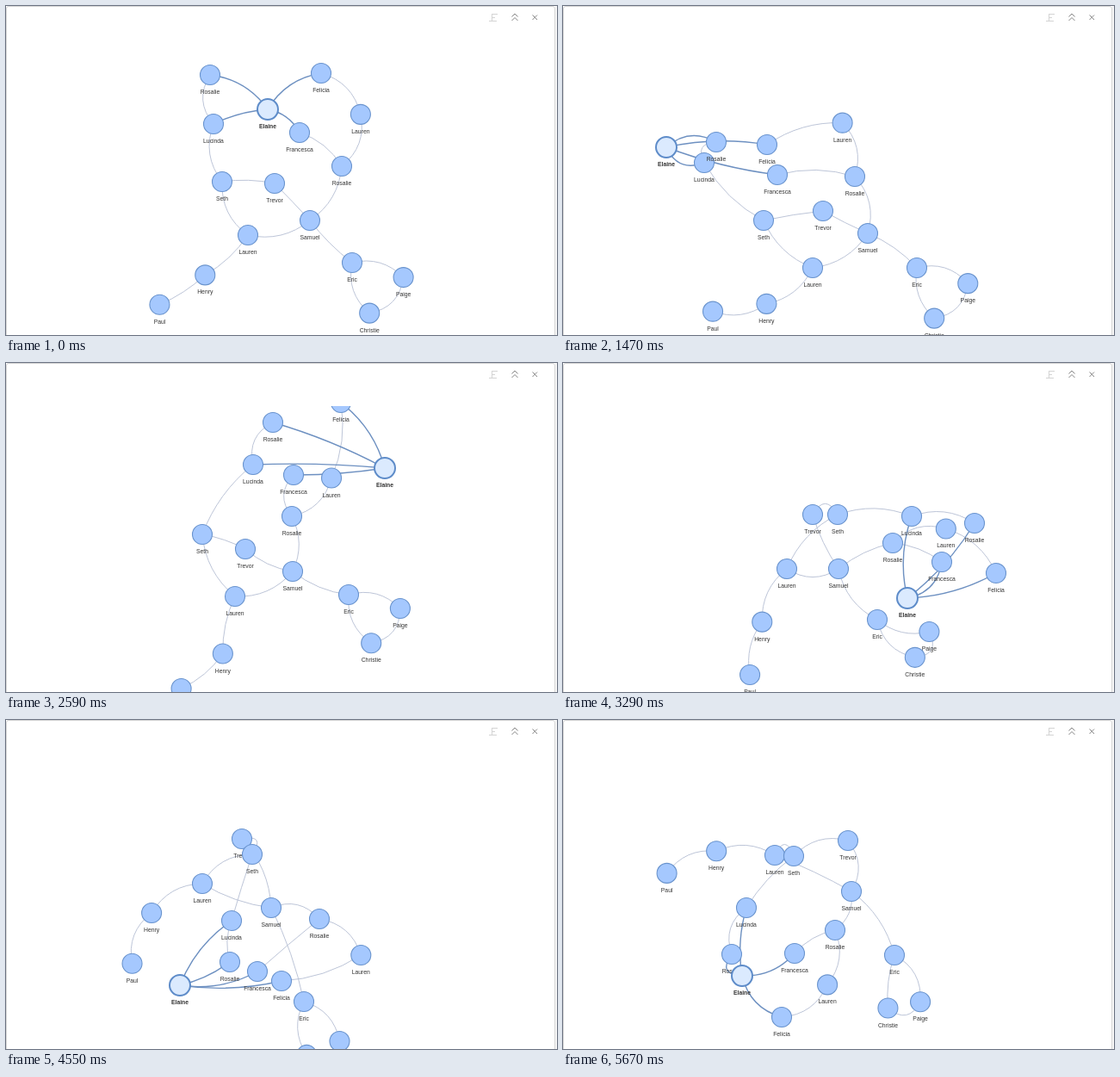
An HTML page that plays this animation: 640 px wide and 382 px high, repeating every 5740 ms.

```html
<!DOCTYPE html>
<html lang="en">
<head>
<meta charset="utf-8">
<title>Network graph</title>
<style>
html, body { margin: 0; width: 100%; height: 100%; overflow: hidden; background: #fff; }
svg { display: block; width: 640px; height: 382px; }
path { fill: none; }
.frame { stroke: #d6d6d6; }
.icon { stroke: #858585; stroke-width: 1; }
.faint { stroke: #d4d4d4; }
.edge { stroke: #bdc5d8; stroke-width: 1; }
.edge.active { stroke: #6d90c1; stroke-width: 1.4; }
circle { fill: #a5c8fe; stroke: #6993cd; stroke-width: 1.1; }
text { font: 6.8px "Liberation Sans", Arial, sans-serif; fill: #343434; text-anchor: middle; }
.active circle { fill: #dbeafe; stroke: #5e8cc9; stroke-width: 2; }
.active text { font-weight: bold; }
</style>
</head>
<body>
<svg viewBox="0 0 640 382">
  <clipPath id="view"><rect y="50" width="637" height="332"/></clipPath>
  <rect x="638" width="2" height="382" fill="#f6f6f6"/>
  <path class="frame" d="M0.5 382V3Q.5.5 3 .5H635Q637.5.5 637.5 3V382"/>
  <path class="icon faint" d="M564 9.5H571M564.5 9V17M564 13.5H568M561 17.5H570"/>
  <path class="icon" d="M587.5 12.5L591 9L594.5 12.5M587.5 17L591 13.5L594.5 17"/>
  <path class="icon" d="M611.5 10.5L617 16M617 10.5L611.5 16"/>
  <g clip-path="url(#view)"><g id="edges"></g><g id="nodes"></g></g>
</svg>
<script>
const LOOP = 5740, STEP = 70;
const KEYS = [0, 910, 1470, 2590, 3290, 4550, 5670];
const nodes = [], edges = [];

function add(parent, tag, attrs, text) {
  const el = document.createElementNS('http://www.w3.org/2000/svg', tag);
  for (const k in attrs) el.setAttribute(k, attrs[k]);
  if (text) el.textContent = text;
  return parent.appendChild(el);
}

// Cubic Hermite through unevenly spaced keys, at rest at both ends
function sample(v, t, keys = KEYS) {
  const last = keys.length - 1;
  let i = 0;
  while (i < last - 1 && t >= keys[i + 1]) i++;
  const slope = k => k === 0 || k === last ? 0 : (v[k + 1] - v[k - 1]) / (keys[k + 1] - keys[k - 1]);
  const h = keys[i + 1] - keys[i];
  const u = Math.min(1, (t - keys[i]) / h), w = 1 - u;
  return v[i] * (1 + 2 * u) * w * w + v[i + 1] * u * u * (3 - 2 * u)
    + h * u * w * (slope(i) * w - slope(i + 1) * u);
}

// A node either follows a path or swings around another node at a fixed distance
const path = (xs, ys, keys) => t => ({ x: sample(xs, t, keys), y: sample(ys, t, keys) });

const swing = (hub, length, ...degrees) => t => {
  const a = sample(degrees, t) * Math.PI / 180;
  return { x: hub.x + length * Math.cos(a), y: hub.y + length * Math.sin(a) };
};

function node(name, place, active = false) {
  const el = add(document.getElementById('nodes'), 'g', active ? { class: 'active' } : {});
  add(el, 'circle', { r: active ? 12 : 11.5 });
  add(el, 'text', { y: 22 }, name);
  const n = { el, place, active };
  nodes.push(n);
  return n;
}

function link(a, ...others) {
  for (const b of others) {
    const active = a.active || b.active;
    const el = add(document.getElementById('edges'), 'path', { class: active ? 'edge active' : 'edge' });
    edges.push({ el, a, b });
  }
}

const lauren2 = node('Lauren', path([281, 281, 290, 266, 260, 228, 246], [266, 282, 304, 271, 239, 190, 157]));
const henry = node('Henry', swing(lauren2, 68, 137, 141, 142, 102, 115, 150, 184));
const paul = node('Paul', swing(henry, 63, 147, 156, 172, 140, 103, 111, 156));
const trevor = node('Trevor', path([312, 306, 302, 278, 290, 274, 331], [206, 239, 238, 216, 176, 138, 140]));
const seth = node('Seth', path([251, 235, 233, 228, 319, 286, 268], [204, 237, 249, 199, 176, 156, 158]));
const samuel = node('Samuel', path([353, 359, 354, 333, 320, 308, 335], [249, 255, 264, 242, 239, 218, 199]));
const eric = node('Eric', path([402, 402, 411, 398, 365, 346, 385], [298, 305, 304, 269, 298, 327, 273]));
const paige = node('Paige', swing(eric, 62, 16, 14, 17, 15, 13, 48, 61));
const christie = node('Christie', swing(eric, 62, 71, 68, 71, 65, 45, 87, 97));
const lucinda = node('Lucinda', path([241, 226, 164, 287, 405, 262, 213], [137, 155, 182, 118, 178, 233, 218]));
const rosalie = node('Rosalie', path([237, 274, 178, 310, 478, 260, 196], [80, 141, 158, 69, 186, 281, 272]));
const francesca = node('Francesca', path([341, 332, 249, 334, 440, 292, 269], [147, 196, 196, 130, 231, 292, 271]));
const rosalie2 = node('Rosalie', path([390, 408, 339, 332, 383, 364, 316], [186, 194, 198, 178, 209, 231, 244]));
const lauren = node('Lauren', swing(rosalie2, 64, -70, -84, -103, -44, -15, 41, 98));
const felicia = node('Felicia', path([366, 333, 237, 389, 530, 503, 320, 254], [78, 151, 161, 46, 200, 244, 303, 345],
  [0, 910, 1470, 2590, 3150, 3290, 4550, 5670]));
const elaine = node('Elaine', path([304, 222, 120, 92, 440, 400, 202, 208], [120, 218, 164, 74, 122, 273, 308, 297],
  [0, 910, 1470, 1890, 2590, 3290, 4550, 5670]), true);

link(samuel, rosalie2, trevor, lauren2, eric);
link(seth, lucinda, trevor, lauren2);
link(henry, lauren2, paul);
link(eric, paige, christie);
link(paige, christie);
link(lauren, felicia, rosalie2);
link(francesca, rosalie2);
link(rosalie, lucinda);
link(elaine, rosalie, lucinda, felicia, francesca);

// Nodes and edge middles repel an edge's middle; shorter edges have more slack to bow
function bow(edge) {
  const { a, b, x, y } = edge;
  const dx = b.x - a.x, dy = b.y - a.y, length = Math.hypot(dx, dy) || 1;
  const nx = -dy / length, ny = dx / length;
  let push = 0;
  for (const p of [...nodes, ...edges]) {
    if (p === edge || p === a || p === b) continue;
    const px = x - p.x, py = y - p.y;
    push += (px * nx + py * ny) / (px * px + py * py + 400) ** 1.5;
  }
  const slack = Math.max(0, 15 - 0.08 * length);
  const k = 2 * slack * Math.tanh(1400 * push);
  return `${x + nx * k} ${y + ny * k}`;
}

function draw(t) {
  for (const n of nodes) {
    Object.assign(n, n.place(t));
    n.el.setAttribute('transform', `translate(${n.x} ${n.y})`);
  }
  for (const e of edges) {
    e.x = (e.a.x + e.b.x) / 2;
    e.y = (e.a.y + e.b.y) / 2;
  }
  for (const e of edges) {
    e.el.setAttribute('d', `M${e.a.x} ${e.a.y}Q${bow(e)} ${e.b.x} ${e.b.y}`);
  }
}

let start;
function tick(now) {
  start ??= now;
  const t = Math.max(0, now - start) % LOOP;
  draw(Math.floor(t / STEP) * STEP);
  requestAnimationFrame(tick);
}
draw(0);
requestAnimationFrame(tick);
</script>
</body>
</html>
```
